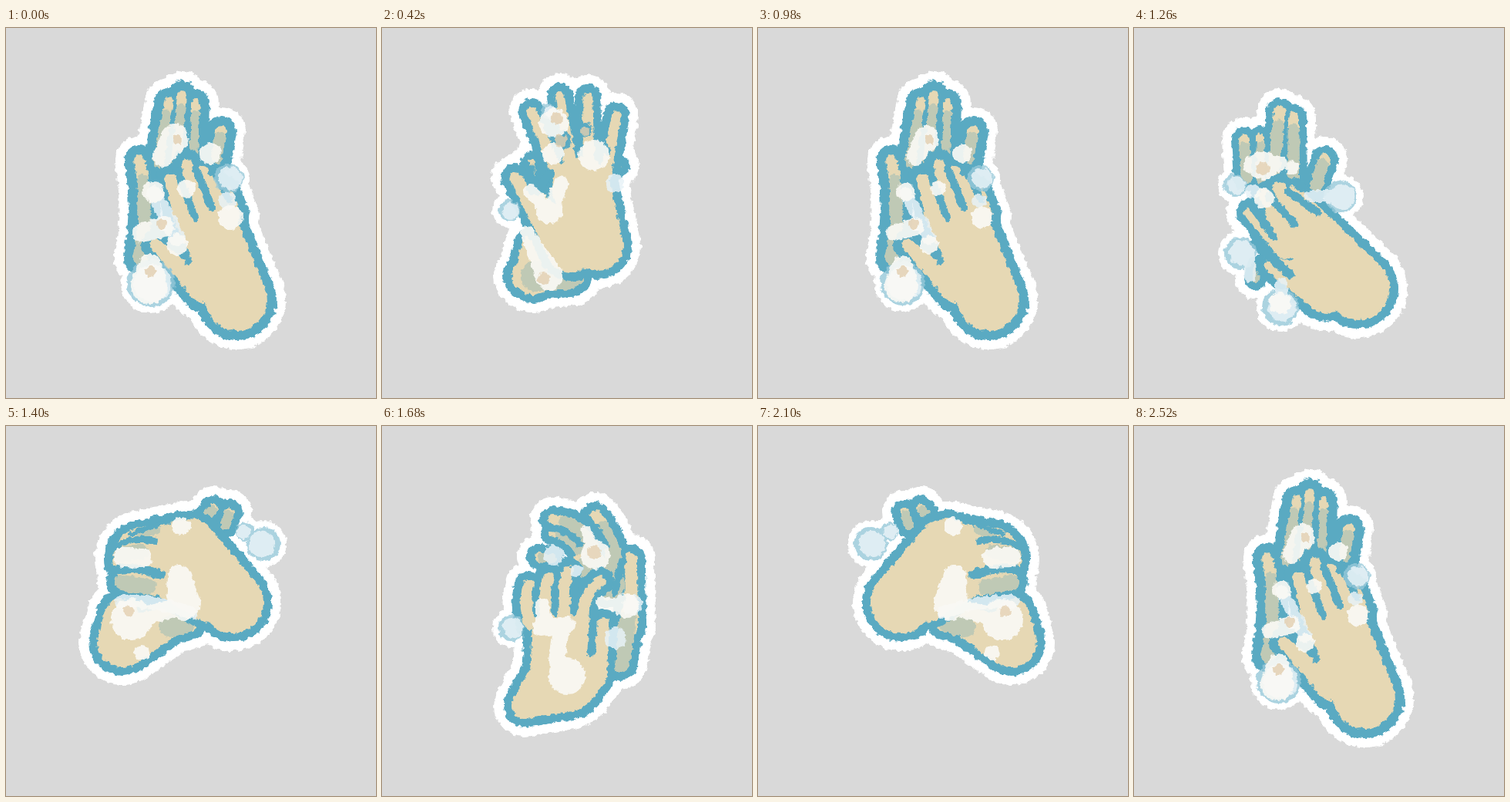
Write an HTML page with a canvas that moves like this. It is 480x480 px and loops after 2.66 s.

```html
<!DOCTYPE html>
<html lang="en">
<head>
<meta charset="utf-8">
<title>Washing hands</title>
<style>
html, body { margin: 0; width: 100%; height: 100%; overflow: hidden; background: #d9d9d9; }
canvas { display: block; filter: url(#rough); }
svg { position: absolute; width: 0; height: 0; }
</style>
</head>
<body>
<canvas id="stage" width="480" height="480"></canvas>
<svg>
  <filter id="rough" filterUnits="userSpaceOnUse" x="0" y="0" width="480" height="480" color-interpolation-filters="sRGB">
    <feTurbulence type="fractalNoise" baseFrequency="0.16" numOctaves="2" seed="4" result="noise"/>
    <feDisplacementMap in="SourceGraphic" in2="noise" scale="7" xChannelSelector="R" yChannelSelector="G"/>
  </filter>
</svg>
<script>
const ctx = document.getElementById('stage').getContext('2d');
const BLUE = '#5aaac2', TAN = '#e6d8b4', SHADE = '#bfc9b5';
const SIZE = 480, FRAME_MS = 140, HALO = 12, RING_HALO = 8, WET_FROM = 0.2;

// A limb is [x, y, r, x2, y2, r2, bend]: a disc swept along a bent line.
// With only x, y, r it is a single disc.
function sweep(path, [x, y, r, x2 = x, y2 = y, r2 = r, bend = 0], grow, from) {
  const length = Math.hypot(x2 - x, y2 - y) || 1, steps = 40;
  for (let i = 0; i <= steps; i++) {
    const t = from + (1 - from) * i / steps;
    const side = 4 * bend * t * (1 - t) / length;
    const cx = x + (x2 - x) * t - (y2 - y) * side;
    const cy = y + (y2 - y) * t + (x2 - x) * side;
    const radius = r + (r2 - r) * t + grow;
    path.moveTo(cx + radius, cy);
    path.arc(cx, cy, radius, 0, 2 * Math.PI);
  }
}

function paint(limbs = [], color, grow = 0, from = 0) {
  const path = new Path2D();
  limbs.forEach(limb => sweep(path, limb, grow, from));
  ctx.fillStyle = color;
  ctx.fill(path);
}

// Spreads limbs evenly from the first to the last; arch lifts the middle tips.
const fan = (count, first, last, arch = 0) => Array.from({ length: count }, (_, i) => {
  const t = i / (count - 1);
  const limb = first.map((v, k) => v + (last[k] - v) * t);
  limb[1] -= arch * Math.sin(Math.PI * t);
  return limb;
});

const bones = hand => [...(hand.dry || []), ...(hand.damp || [])];

function drawHand(hand) {
  paint(bones(hand), BLUE, hand.rim);
  paint(bones(hand), TAN);
  paint(hand.damp, SHADE, 0, WET_FROM);
  paint(hand.gaps, BLUE);
}

function drawPose({ hands, rings, mist, foam, dots }, swell) {
  hands.forEach(hand => paint(bones(hand), '#fff', hand.rim + HALO));
  paint(rings, '#fff', RING_HALO + swell);
  hands.forEach(drawHand);
  paint(rings, 'rgba(150,200,217,.8)', swell);
  paint([...rings.map(([x, y, r]) => [x + 2, y, r * 0.78]), ...mist], 'rgba(232,243,247,.85)', swell);
  paint(foam, 'rgba(251,250,246,.9)', swell);
  paint(dots, 'rgba(227,207,176,.8)');
}

const poses = {
  prayer: {
    hands: [
      {
        rim: 13,
        damp: [...fan(3, [211, 96, 6, 198, 175, 7], [246, 97, 5, 243, 175, 6], 10),
               [279, 134, 7, 273, 170, 7], [173, 172, 7, 174, 298, 9, -6]]
      },
      {
        rim: 12,
        dry: [[251, 226, 37, 299, 353, 40], [194, 281, 7, 255, 338, 18],
              ...fan(3, [213, 195, 7, 226, 255, 7], [255, 184, 6, 270, 240, 8], 14),
              [287, 209, 5, 297, 245, 8]],
        gaps: [...fan(3, [222, 186, 5, 245, 245, 5], [273, 186, 6, 289, 222, 5]),
               [197, 266, 5, 236, 303, 5, -9]]
      }
    ],
    rings: [[289, 195, 17], [188, 331, 29]],
    mist: [[192, 215, 8, 222, 272, 9], [287, 224, 9]],
    foam: [[219, 142, 16, 204, 167, 11], [265, 163, 12], [191, 213, 12], [234, 208, 10],
           [291, 246, 14], [176, 266, 10, 204, 258, 12], [222, 281, 12], [187, 308, 13, 186, 334, 22]],
    dots: [[222, 145, 6], [202, 254, 7], [187, 316, 7]]
  },
  splayed: {
    hands: [
      {
        rim: 11,
        dry: [[192, 280, 10, 196, 322, 24], [308, 179, 3]],
        damp: [[188, 322, 20, 244, 320, 18], [194, 175, 4, 195, 195, 4]]
      },
      {
        rim: 11,
        dry: [[258, 205, 38, 280, 282, 33], [172, 194, 7, 245, 285, 32],
              ...fan(4, [194, 108, 6, 224, 180, 8], [304, 113, 6, 290, 190, 8], 25)],
        gaps: [[192, 183, 6, 216, 190, 6, 26], [232, 146, 13], [264, 132, 9], [286, 150, 5, 292, 160, 5]]
      }
    ],
    rings: [[165, 237, 14], [216, 108, 10]],
    mist: [[302, 202, 12]],
    foam: [[223, 123, 19], [222, 163, 14], [275, 165, 20], [217, 237, 17], [192, 212, 9, 215, 235, 10],
           [232, 202, 10, 222, 230, 10], [188, 265, 8, 217, 322, 18]],
    dots: [[227, 117, 8], [264, 134, 6], [210, 325, 8], [232, 146, 8]]
  },
  slanted: {
    hands: [
      {
        rim: 10,
        damp: [...fan(2, [143, 145, 7, 146, 195, 7], [164, 141, 5, 164, 195, 6]),
               ...fan(2, [189, 109, 8, 180, 195, 8], [207, 116, 7, 207, 195, 8]),
               [247, 171, 8, 236, 205, 8], [160, 310, 5, 158, 325, 5]]
      },
      {
        rim: 11,
        dry: [[205, 245, 34, 291, 338, 41], [178, 308, 9, 250, 338, 32],
              ...fan(3, [151, 240, 8, 195, 290, 10], [188, 208, 8, 220, 250, 12], 6),
              [206, 210, 5, 235, 240, 10]],
        gaps: [...fan(3, [149, 225, 5, 181, 271, 5], [200, 212, 5, 238, 239, 5]), [156, 280, 6, 202, 319, 6]]
      }
    ],
    rings: [[131, 204, 15], [268, 219, 21], [138, 292, 21], [190, 362, 24]],
    mist: [[230, 218, 8, 260, 218, 8], [150, 298, 8, 151, 322, 8], [191, 332, 8, 191, 350, 8], [154, 212, 10]],
    foam: [[167, 178, 19], [153, 178, 11, 187, 176, 11], [205, 181, 9], [169, 221, 13], [190, 357, 14]],
    dots: [[167, 183, 9]]
  },
  clasped: {
    hands: [
      {
        rim: 11,
        dry: [[262, 252, 18, 329, 280, 33], [329, 280, 33, 330, 245, 22]],
        damp: [...fan(2, [190, 112, 6, 196, 128, 6], [211, 107, 6, 220, 118, 6]), [240, 256, 10, 268, 260, 14]]
      },
      {
        rim: 11,
        dry: [[186, 229, 40, 243, 158, 38], [243, 158, 38, 302, 172, 40], [215, 225, 30, 270, 195, 28]],
        damp: [[281, 134, 6, 305, 138, 6], ...fan(2, [298, 162, 9, 331, 167, 10], [287, 210, 10, 329, 203, 10])],
        gaps: [[288, 149, 5, 340, 157, 4, -5], [279, 193, 6, 344, 188, 6, -5], [268, 123, 3, 318, 140, 3]]
      }
    ],
    rings: [[146, 153, 22], [170, 137, 12]],
    mist: [[240, 243, 8, 330, 228, 9, -5]],
    foam: [[253, 130, 12], [304, 171, 13, 328, 170, 13], [255, 195, 15, 250, 230, 22],
           [250, 234, 11, 300, 246, 12], [317, 251, 27], [304, 294, 10]],
    dots: [[321, 240, 7]]
  },
  cupped: {
    hands: [
      {
        rim: 11,
        dry: [[323, 172, 8, 324, 262, 8]],
        damp: [[221, 121, 6, 272, 160, 10, -10], [277, 117, 8, 302, 200, 11, -8], [222, 139, 5, 255, 160, 7, -4],
               [204, 170, 6, 220, 172, 6], [268, 178, 20, 295, 205, 20], [322, 235, 10, 308, 305, 14]],
        gaps: [...fan(2, [214, 133, 4, 256, 153, 5, -6], [260, 116, 4, 290, 156, 5, -4]), [312, 175, 5, 302, 215, 5]]
      },
      {
        rim: 11,
        dry: [[231, 255, 36, 238, 325, 46], [185, 363, 17, 238, 325, 46],
              ...fan(3, [190, 206, 7, 193, 255, 9, 4], [242, 188, 7, 236, 245, 9, 4]),
              [283, 201, 7, 261, 250, 8, 7], [288, 255, 7, 272, 322, 20]],
        gaps: [...fan(3, [199, 215, 5, 200, 244, 5], [251, 211, 5, 249, 241, 5]), [276, 232, 5, 271, 295, 5]]
      }
    ],
    rings: [[168, 262, 17]],
    mist: [[223, 168, 13], [252, 188, 8], [303, 275, 14], [325, 232, 13]],
    foam: [[277, 167, 19], [265, 136, 7, 272, 158, 9], [317, 233, 16], [285, 229, 8, 315, 234, 9],
           [208, 232, 9, 210, 258, 11], [206, 262, 11, 240, 258, 11], [231, 270, 11, 227, 305, 11], [240, 324, 24]],
    dots: [[275, 164, 9]]
  }
};

const step = (name, more) => ({ name, scale: 1, shift: 0, flip: false, swell: 0, ...more });
const mirrored = list => list.map(s => ({ ...s, flip: !s.flip }));
const still = step('prayer');
const rub = [step('prayer', { scale: 0.88 }), step('splayed', { shift: 6 }), step('splayed')];
const wash = [
  step('slanted', { scale: 1.14 }), step('slanted'),
  step('clasped', { flip: true }), step('clasped', { flip: true, shift: -6 }),
  step('cupped')
];
const steps = [{ ...still, swell: 2 }, ...rub, ...mirrored(rub), still, ...wash, ...mirrored(wash), still];

function draw({ name, scale, shift, flip, swell }) {
  const mid = SIZE / 2;
  ctx.clearRect(0, 0, SIZE, SIZE);
  ctx.save();
  ctx.translate(mid, mid);
  ctx.scale(flip ? -scale : scale, scale);
  ctx.translate(shift - mid, shift - mid);
  drawPose(poses[name], swell);
  ctx.restore();
}

let shown = -1;
function tick(now) {
  const index = Math.floor(now / FRAME_MS) % steps.length;
  if (index !== shown) draw(steps[shown = index]);
  requestAnimationFrame(tick);
}
tick(0);
</script>
</body>
</html>
```
